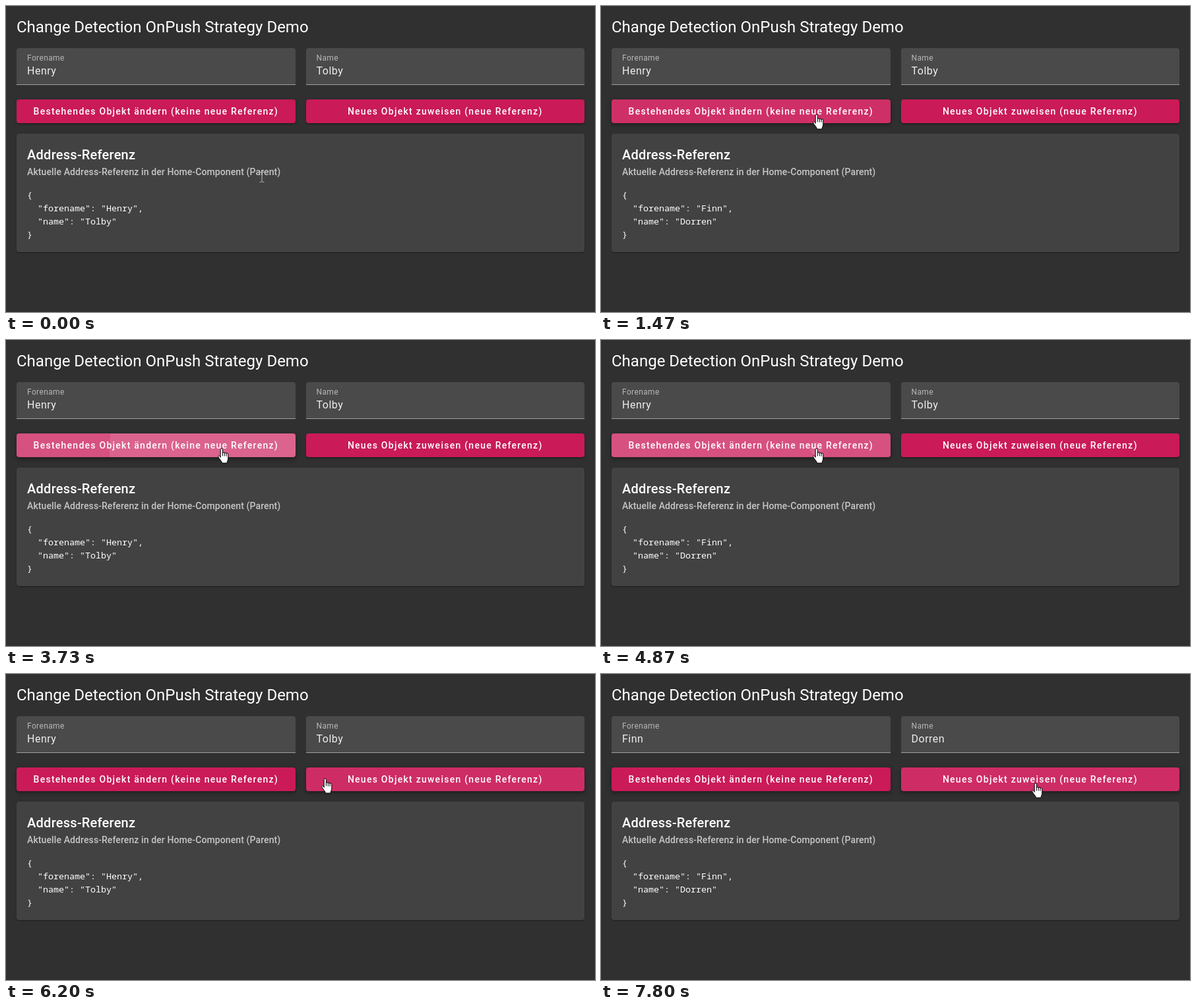
These frames come from a looping animation (893x465 px, 8000 ms). An HTML page:

```html
<!DOCTYPE html>
<html lang="de">
<head>
<meta charset="utf-8">
<title>Change Detection OnPush Strategy Demo</title>
<style>
  html, body { margin: 0; width: 100%; height: 100%; overflow: hidden; background: #303030; }
  body { position: relative; color: #fff; font-family: Roboto, sans-serif; }
  body * { position: absolute; box-sizing: border-box; margin: 0; white-space: pre; }
  h1 { left: 16px; top: 16px; font: 400 24px/32px Roboto, sans-serif; }
  .field { top: 64px; width: 422.5px; height: 56px; background: #4a4a4a;
           border-radius: 4px 4px 0 0; border-bottom: 1px solid #a0a0a0; }
  .field label { left: 16px; top: 6px; font-size: 12px; line-height: 18px;
                 letter-spacing: .375px; color: rgba(255,255,255,.6); }
  .field span { left: 16px; top: 23px; font-size: 16px; line-height: 24px;
                letter-spacing: .5px; color: rgba(255,255,255,.9); }
  .button { top: 142px; width: 422.5px; height: 36px; border-radius: 4px; background: #ca1a58; }
  .clip { inset: 0; overflow: hidden; border-radius: 4px; }
  .tint { inset: 0; background: #fff; }
  .ripple { border-radius: 50%; background: rgba(255,255,255,.1); }
  .button b { inset: 0; text-align: center; font-weight: 500; font-size: 14px;
              line-height: 36px; letter-spacing: 1.25px; }
  .left { left: 16px; }
  .right { left: 454.5px; }
  .card { left: 16px; top: 194px; width: 861px; height: 180px; border-radius: 4px; background: #424242;
          box-shadow: 0 2px 1px -1px rgba(0,0,0,.2), 0 1px 1px rgba(0,0,0,.14), 0 1px 3px rgba(0,0,0,.12); }
  .card h2 { left: 16px; top: 16px; font-weight: 500; font-size: 20px; line-height: 32px; letter-spacing: .25px; }
  .card h3 { left: 16px; top: 47px; font-weight: 500; font-size: 14px; line-height: 22px;
             letter-spacing: .1px; color: rgba(255,255,255,.7); }
  .card pre { left: 16px; top: 83px; font: 13.33px/20px "Noto Sans Mono", monospace; }
  svg { left: 0; top: 0; width: 100%; height: 100%; }
</style>
</head>
<body>
<h1>Change Detection OnPush Strategy Demo</h1>
<div class="field left"><label>Forename</label><span id="forename"></span></div>
<div class="field right"><label>Name</label><span id="name"></span></div>
<div class="button left" id="mutate"><div class="clip"><div class="tint"></div><div class="ripple"></div></div><b>Bestehendes Objekt ändern (keine neue Referenz)</b></div>
<div class="button right" id="assign"><div class="clip"><div class="tint"></div><div class="ripple"></div></div><b>Neues Objekt zuweisen (neue Referenz)</b></div>
<div class="card">
  <h2>Address-Referenz</h2>
  <h3>Aktuelle Address-Referenz in der Home-Component (Parent)</h3>
  <pre id="json"></pre>
</div>
<svg>
  <g id="hand" stroke="#000" stroke-linejoin="round" stroke-linecap="round">
    <path fill="#fff" transform="translate(-5.5 -1)" d="M4.2 14V2.5a1.6 1.6 0 0 1 3.2 0V8a1.4 1.4 0 0 1 2.9.3 1.4 1.4 0 0 1 2.8.7 1.3 1.3 0 0 1 2.7.9V16c0 3-1.7 3.7-1.7 7H6.4c0-2.6-3.2-4.9-5.4-9-.9-1.9 1-2.9 2-1.6z"/>
    <path fill="none" d="M1.9 7v4M4.8 7.3v3.9M7.6 8v3.3"/>
  </g>
  <path id="arrow" fill="#fff" stroke="#000" d="M.5.5v16l3.7-3.5 2.4 5.6 2.5-1.1-2.4-5.4h5.2z"/>
  <path id="beam" fill="none" stroke="#bdbdbd" d="M-3.5-7.5h2.5l1 1 1-1h2.5M0-6.5v13M-3.5 7.5h2.5l1-1 1 1h2.5"/>
</svg>
<script>
const LOOP = 8000, STEP = 200 / 3, PRESS = 120, ENTER = 225, EXIT = 150;
const $ = id => document.getElementById(id);
const people = [['Henry', 'Tolby'], ['Finn', 'Dorren']];

const buttons = [
  { el: $('mutate'), x: 16, clicks: [1166, 2433, 3682, 4865] },
  { el: $('assign'), x: 454.5, clicks: [7424] }
];
const TOP = 142, WIDTH = 422.5, HEIGHT = 36;

// pointer hot spot: step, x, y
const track = [
  [0, 388, 260], [2, 384, 254], [4, 372, 234], [6, 352, 202], [8, 335, 177], [11, 326.5, 165],
  [90, 326.5, 165], [91, 350, 163], [92, 415, 160], [93, 483.5, 159], [95, 570, 159],
  [98, 620, 162], [103, 651.5, 166], [104, 658.5, 166], [120, 658.5, 166]
];

const clamp = v => Math.max(0, Math.min(1, v));
const mix = (a, b, p) => a + (b - a) * p;

// cubic-bezier(x1, 0, .2, 1)
function ease(p, x1) {
  let lo = 0, hi = 1;
  for (let i = 0; i < 24; i++) {
    const s = (lo + hi) / 2, r = 1 - s;
    if (3 * r * r * s * x1 + .6 * r * s * s + s ** 3 < p) lo = s; else hi = s;
  }
  return lo * lo * (3 - 2 * lo);
}

function pointer(step) {
  const i = Math.max(1, track.findIndex(p => p[0] >= step));
  const [a, b] = [track[i - 1], track[i]], p = (step - a[0]) / (b[0] - a[0]);
  return [mix(a[1], b[1], p), mix(a[2], b[2], p)];
}

// y, blur, spread of three layers at rest, raised and pressed
const shadows = [
  [[3, 1, -2], [2, 2, 0], [1, 5, 0]],
  [[2, 4, -1], [4, 5, 0], [1, 10, 0]],
  [[5, 5, -3], [8, 10, 1], [3, 14, 2]]
];
function shadow(level) {
  const i = Math.min(1, Math.floor(level));
  return [.2, .14, .12].map((alpha, n) => {
    const [y, blur, spread] = shadows[i][n].map((v, j) => mix(v, shadows[i + 1][n][j], level - i) + 'px');
    return `0 ${y} ${blur} ${spread} rgba(0,0,0,${alpha})`;
  }).join();
}

function drawButton(b, time, [px, py]) {
  const hover = px >= b.x && px < b.x + WIDTH && py >= TOP && py < TOP + HEIGHT;
  const start = b.clicks.filter(c => c <= time).pop();
  const age = start === undefined ? Infinity : time - start;
  const [tint, ripple] = b.el.firstChild.children;

  tint.style.opacity = age < PRESS ? .24 : hover ? .08 : 0;
  const pressed = age < PRESS ? age : Math.max(0, 2 * PRESS - age);
  b.el.style.boxShadow = shadow((hover || age < Infinity ? 1 : 0) + ease(pressed / 280, .4));

  const cx = px - b.x, cy = py - TOP;
  const reach = Math.hypot(Math.max(cx, WIDTH - cx), Math.max(cy, HEIGHT - cy));
  const r = reach * ease(clamp(age / ENTER), 0);
  Object.assign(ripple.style, {
    left: cx - r + 'px', top: cy - r + 'px', width: 2 * r + 'px', height: 2 * r + 'px',
    opacity: 1 - ease(clamp((age - ENTER) / EXIT), 0)
  });
  return hover;
}

function draw(ms) {
  const step = Math.floor((Math.floor(ms / 10) * 10 + 4) / STEP);
  const time = step * STEP, pos = pointer(step);
  const hover = buttons.map(b => drawButton(b, time, pos)).includes(true);

  const done = b => b.clicks.filter(c => c + PRESS <= time).length;
  const [first, last] = people[(done(buttons[0]) + done(buttons[1])) % 2];
  $('json').textContent = `{\n  "forename": "${first}",\n  "name": "${last}"\n}`;
  const shown = people[done(buttons[1])];
  $('forename').textContent = shown[0];
  $('name').textContent = shown[1];

  const overText = pos[1] > 244 && pos[1] < 262;
  const shape = hover ? 'hand' : overText ? 'beam' : 'arrow';
  for (const id of ['hand', 'beam', 'arrow']) {
    $(id).style.display = id === shape ? '' : 'none';
    $(id).setAttribute('transform', `translate(${pos})`);
  }
}

const begin = performance.now();
function tick() {
  draw((performance.now() - begin) % LOOP);
  requestAnimationFrame(tick);
}
tick();
</script>
</body>
</html>
```
